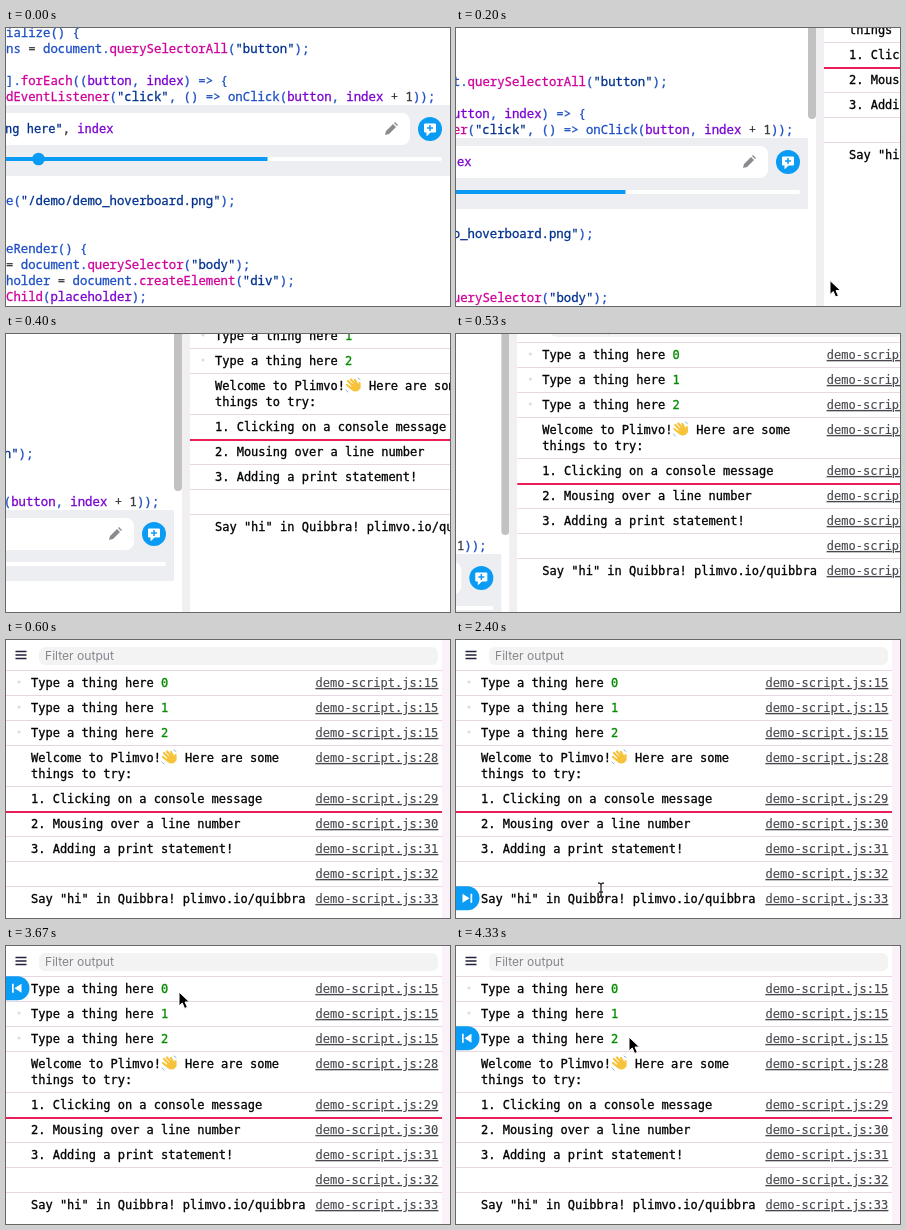
An HTML page that plays this animation: 444x278 px, repeating every 5.6 s.

```html
<!DOCTYPE html>
<html lang="en">
<head>
<meta charset="utf-8">
<title>Console hover demo</title>
<style>
  html, body { margin: 0; height: 100%; overflow: hidden; background: #fff; }
  svg { display: block; width: 100vw; height: 100vh; }
  text { white-space: pre; font: 12px "DejaVu Sans Mono", monospace; color: #000; }
  text, tspan { fill: currentColor; stroke: currentColor; stroke-width: .3px; }
  .code text { font: 12.33px "Noto Sans Mono", monospace; color: #1d4fc4; }
  .code .string { color: #00308f; }
  .code .method { color: #d0009a; }
  .code .local { color: #7a00d2; }
  .code .operator { color: #38383d; }
  .code .field { font: 12px "DejaVu Sans Mono", monospace; }
  .number { color: #058b00; }
  .link { color: #48484f; text-decoration: underline; stroke-width: .15px; }
  text.filter { font: 12.1px Inter, sans-serif; color: #85858c; stroke: none; }
  .border { stroke: #e8d6e0; }
</style>
</head>
<body>
<svg viewBox="0 0 444 278">
  <defs>
    <path id="arrow" d="M0 0V14l3.300-3 2.300 5.500 2.800-1.200-2.400-5.300h4.500z" stroke="#fff" stroke-linejoin="round"/>
  </defs>
  <g id="editor" class="code">
    <g id="codeLines"></g>
    <rect x="-10" y="77" width="454" height="71" fill="#eceef1"/>
    <rect x="-20" y="85" width="424" height="32" rx="8" fill="#fff"/>
    <text class="field" x="-1" y="105"><tspan class="string">ng here"</tspan><tspan class="operator">, </tspan><tspan class="local">index</tspan></text>
    <path d="M379 107l1-4 7-7 3 3-7 7zM388 95l1-1 3 3-1 1z" fill="#8a8a8f"/>
    <circle cx="424" cy="101" r="12" fill="#0a9cf5"/>
    <path d="M418.500 96h11v8h-5l-3.500 3.500v-3.500h-2.500z" fill="#fff" stroke="#fff" stroke-linejoin="round"/>
    <path d="M421 100h6M424 97v6" stroke="#0a9cf5" stroke-width="1.500"/>
    <g stroke-width="4" stroke-linecap="round">
      <path d="M-10 131H434" stroke="#fff"/>
      <path d="M-10 131H261.500" stroke="#0a9cf5" stroke-linecap="butt"/>
    </g>
    <circle cx="32.500" cy="131" r="6.300" fill="#0a9cf5"/>
    <rect x="444" y="-200" width="8" height="258" rx="4" fill="#c2c2c2"/>
  </g>
  <g id="console">
    <rect x="-8" y="-200" width="8" height="800" fill="#f2eff3"/>
    <rect y="-200" width="444" height="800" fill="#fff"/>
    <rect x="436" width="8" height="278" fill="#fbf2f9"/>
    <path d="M9.500 11.500h11M9.500 15h11M9.500 18.500h11" stroke="#20203a" stroke-width="1.700"/>
    <rect x="33" y="7" width="399" height="18" rx="6" fill="#f3f3f4"/>
    <text class="filter" x="39" y="20">Filter output</text>
    <g id="rows"></g>
    <path d="M0 172H436" stroke="#ea1f5a" stroke-width="2"/>
    <g stroke="#f7c33b" stroke-width="2.200" stroke-linecap="round" fill="none">
      <path d="M158 113l5 5M161 111.500l5 6M165 112l3 6M157 117l5 4M169.500 115v5"/>
      <ellipse cx="165.500" cy="119.500" rx="3.500" ry="3" fill="#f7c33b"/>
      <path d="M156 122l2 2M168 110l2 1.500" stroke="#8ab4d8" stroke-width="1"/>
    </g>
    <g id="button">
      <path d="M0-12H11.500a12 12 0 0 1 0 24H0z" fill="#0a9cf5"/>
      <path id="buttonIcon" fill="#fff"/>
    </g>
    <use href="#arrow" x="6" y="384.500"/>
    <g id="pointer">
      <use id="hoverArrow" href="#arrow"/>
      <path id="beam" d="M-3-7q3 0 3 2V5q0 2-3 2M3-7q-3 0-3 2V5q0 2 3 2M-2 2h4" fill="none" stroke="#333" stroke-width="1.400"/>
    </g>
  </g>
</svg>
<script>
const el = id => document.getElementById(id);
const LOOP = 5600, FRAME = 1000 / 15;

const codeLines = [
  [9, 'ialize() {'],
  [25, 'ns = document.querySelectorAll("button");'],
  [57, '].forEach((button, index) => {'],
  [73, 'dEventListener("click", () => onClick(button, index + 1));'],
  [177, 'e("/demo/demo_hoverboard.png");'],
  [225, 'eRender() {'],
  [241, '= document.querySelector("body");'],
  [257, 'holder = document.createElement("div");'],
  [273, 'Child(placeholder);'],
];
const tokenClasses = [
  ['string', /^"/],
  ['method', /^(querySelector|forEach|dEvent|createElement|Child)/],
  ['local', /^(button|index|placeholder)$/],
  ['operator', /^[=+\d]$/],
  ['name', /./],
];
const colorize = line => line.replace(/"[^"]*"|\w+|=>|[=+]/g, token => {
  const [name] = tokenClasses.find(([, pattern]) => pattern.test(token));
  return `<tspan class="${name}">${token}</tspan>`;
});
el('codeLines').innerHTML = codeLines
  .map(([y, line]) => `<text y="${y}">${colorize(line)}</text>`).join('');

const thing = n => `Type a thing here <tspan class="number">${n}</tspan>`;
// Each row: top edge, bottom edge, source line, text lines.
const rows = [
  [30.5, 55.5, 15, thing(0)],
  [55.5, 80.5, 15, thing(1)],
  [80.5, 105.5, 15, thing(2)],
  [105.5, 146.5, 28, 'Welcome to Plimvo!<tspan x="179">Here are some</tspan>', 'things to try:'],
  [146.5, 171.5, 29, '1. Clicking on a console message'],
  [171.5, 196.5, 30, '2. Mousing over a line number'],
  [196.5, 221.5, 31, '3. Adding a print statement!'],
  [221.5, 246.5, 32, ''],
  [246.5, 271.5, 33, 'Say "hi" in Quibbra! plimvo.io/quibbra'],
];
el('rows').innerHTML = rows.map(([top, , line, ...texts], i) => {
  const base = top + 16.5;
  return `<path class="border" d="M0 ${top}H436"/>` +
    texts.map((t, k) => `<text x="25" y="${base + 16 * k}">${t}</text>`).join('') +
    `<text class="link" x="309.500" y="${base}">demo-script.js:${line}</text>` +
    (i < 3 ? `<circle cx="13" cy="${base - 5}" r="1.500" fill="#dcdce0"/>` : '');
}).join('');

// Pointer height over time, as [frame, y].
const wiggle = [[44, 62], [45, 53], [46, 42], [47, 42], [49, 62], [52, 62], [54, 42],
  [55, 46], [57, 87], [60, 87], [62, 44], [63, 46], [65, 91]];

function pointerAt(frame) {
  if (frame <= 44) {
    const p = (frame - 36) / 8, eased = p * (2 - p);
    return [145 + 28 * eased, 250 - 188 * eased];
  }
  const next = wiggle.findIndex(([f]) => f >= frame);
  if (next < 0) return [173, 91];
  const [f0, y0] = wiggle[next - 1], [f1, y1] = wiggle[next];
  return [173, y0 + (y1 - y0) * (frame - f0) / (f1 - f0)];
}

const move = (id, x, y) => el(id).setAttribute('transform', `translate(${x} ${y})`);
const show = (id, on) => { el(id).style.display = on ? '' : 'none'; };

function draw(time) {
  const frame = Math.floor((time + 4) / FRAME);
  const pan = Math.min(1, Math.max(0, (frame - 1.5) / 7.5));
  move('editor', -460 * pan, 165 * pan);
  move('console', 460 * (1 - pan), -165 * (1 - pan));

  const hovering = frame >= 36;
  show('button', hovering);
  show('pointer', hovering);
  if (!hovering) return;

  const [x, y] = pointerAt(frame);
  const [top] = rows.find(row => y + 4 < row[1]);
  const overText = y > 112;
  move('pointer', x, y);
  show('beam', overText);
  show('hoverArrow', !overText);
  move('button', 0, top + 11.8);
  el('buttonIcon').setAttribute('d', top > 170
    ? 'M6.500-4.500l7 4.500-7 4.500zM14.500-4.500h1.700v9h-1.700z'
    : 'M15.500-4.500l-7 4.500 7 4.500zM6-4.500h1.700v9h-1.700z');
}

const start = performance.now();
(function tick() {
  draw((performance.now() - start) % LOOP);
  requestAnimationFrame(tick);
})();
</script>
</body>
</html>
```
